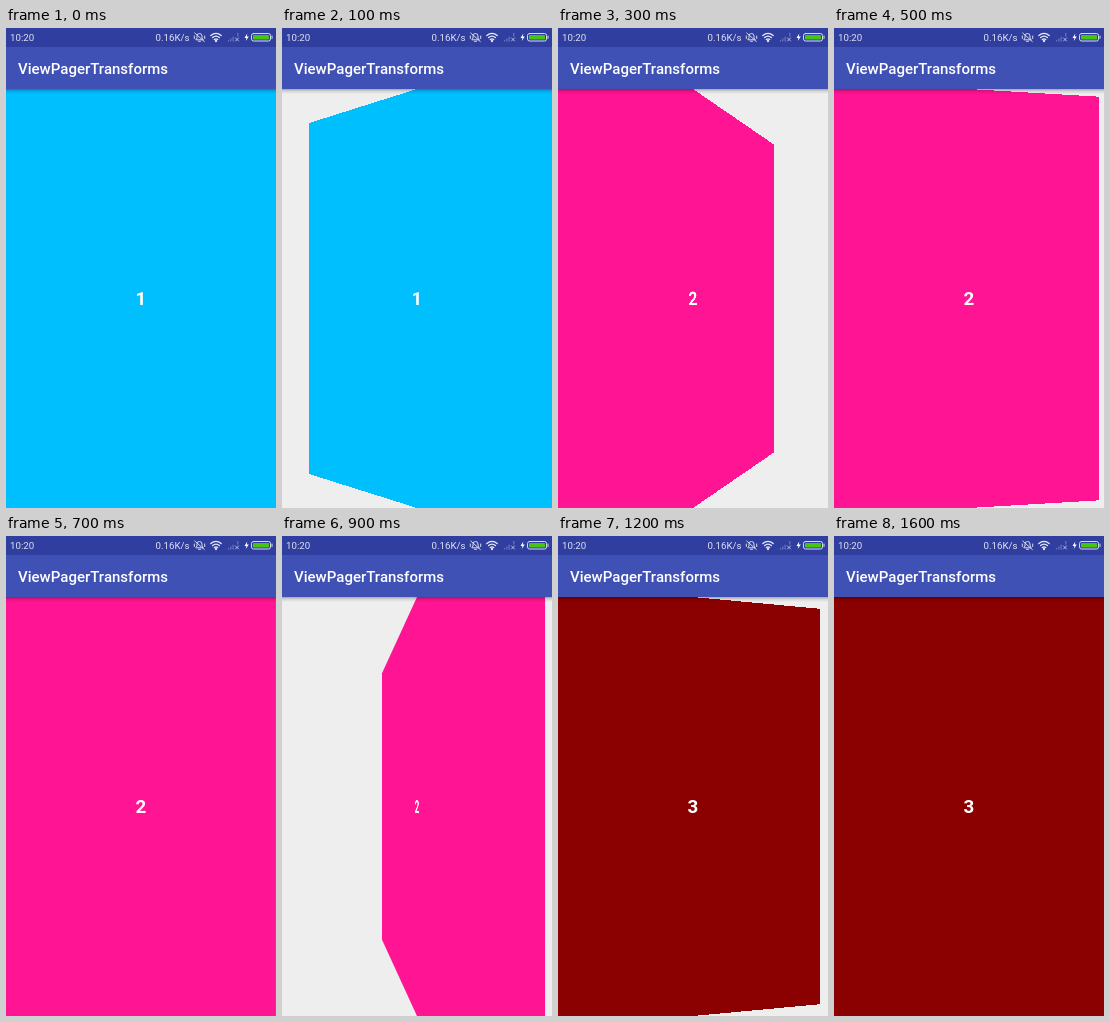
Animation of 270 by 480 pixels, one loop 1700 ms. Source, as an HTML page:

```html
<!DOCTYPE html>
<html lang="en">
<head>
<meta charset="utf-8">
<title>Page flip</title>
<style>
  html, body { margin: 0; width: 100%; height: 100%; overflow: hidden; background: #eee; }
  #stage { position: relative; width: 270px; height: 480px; overflow: hidden; background: #eee; font-family: Roboto, sans-serif; }
  #pager { position: absolute; left: 0; top: 61px; width: 270px; height: 419px; overflow: hidden; perspective: 216px; }
  .page {
    position: absolute; inset: 0;
    display: flex; align-items: center; justify-content: center;
    color: #fff; font-size: 18.75px; font-weight: 700;
  }
  #shadow { position: absolute; left: 0; top: 61px; width: 270px; height: 5px; background: linear-gradient(rgba(0,0,0,.3), rgba(0,0,0,.1) 45%, transparent); }
  svg { position: absolute; left: 0; top: 0; }
</style>
</head>
<body>
<div id="stage">
  <div id="pager">
    <div class="page" style="background:#00bfff">1</div>
    <div class="page" style="background:#ff1493">2</div>
    <div class="page" style="background:#8b0000">3</div>
  </div>
  <div id="shadow"></div>
  <svg width="270" height="61" fill="none" stroke-linecap="round">
    <path d="M0 0H270V19H0Z" fill="#303f9f"/>
    <path d="M0 19H270V61H0Z" fill="#3f51b5"/>
    <g font-family="Roboto, sans-serif" fill="#fff">
      <text x="12" y="46" font-size="15" font-weight="500">ViewPagerTransforms</text>
      <g font-size="9.7" fill="#dfe2f2">
        <text x="4" y="13.3">10:20</text>
        <text x="149.5" y="13.3">0.16K/s</text>
      </g>
    </g>
    <!-- muted bell -->
    <g stroke="#d5d9ee" stroke-width="1">
      <path d="M190 11.5L191 10V8a2.5 2.5 0 0 1 5 0V10L197 11.5ZM192.5 13.3H194.5M188.7 5L198.3 13.5M188.3 8V10.5M198.7 8V10.5"/>
    </g>
    <!-- wifi -->
    <g stroke="#e8eaf6" stroke-width="1.3">
      <path d="M204.8 7.6Q210 3.2 215.2 7.6M206.6 9.6Q210 6.7 213.4 9.6M208.3 11.5Q210 10.1 211.7 11.5"/>
      <circle cx="210" cy="13" r=".5" fill="#e8eaf6"/>
    </g>
    <!-- no signal -->
    <g stroke="#6672ba" stroke-width="1.3">
      <path d="M222.5 12.5V13M224.8 11V13M227.1 9.2V13M231.8 5.5V8"/>
      <path d="M229.5 10L232.5 13M232.5 10L229.5 13" stroke="#c5cae9" stroke-width=".9"/>
    </g>
    <!-- charging battery -->
    <path d="M241.3 5.5L238.5 10H240.4L239.8 13L242.8 8.6H240.8Z" fill="#fff"/>
    <rect x="245.5" y="5.5" width="19" height="7.5" rx="2" stroke="#d5d9ee"/>
    <rect x="247" y="7" width="16" height="4.5" rx=".8" fill="#43c512"/>
    <path d="M266 8V10.5" stroke="#d5d9ee"/>
  </svg>
</div>
<script>
  const LOOP = 1700, STEP = 100;
  const pages = [...document.querySelectorAll('.page')];

  // Each swipe is a short drag followed by a quintic ease-out.
  const swipes = [
    { start: 100, end: 840, duration: 748 },
    { start: 800, end: 1559, duration: 722 },
  ];

  function swipeProgress(time, { start, end, duration }) {
    if (time < start) return 0;
    const left = Math.max(0, (end - time) / duration);
    return 1 - Math.min(0.9, left ** 5);
  }

  function draw(now) {
    const time = Math.floor((now % LOOP) / STEP) * STEP;
    const offset = time >= swipes[1].start
      ? 1 + swipeProgress(time, swipes[1])
      : swipeProgress(time, swipes[0]);
    pages.forEach((page, i) => {
      const position = i - offset;
      page.style.visibility = Math.abs(position) < 0.5 ? 'visible' : 'hidden';
      page.style.transform = `rotateY(${180 * position}deg)`;
    });
  }

  const origin = performance.now();
  function tick() {
    draw(performance.now() - origin);
    requestAnimationFrame(tick);
  }
  tick();
</script>
</body>
</html>
```
